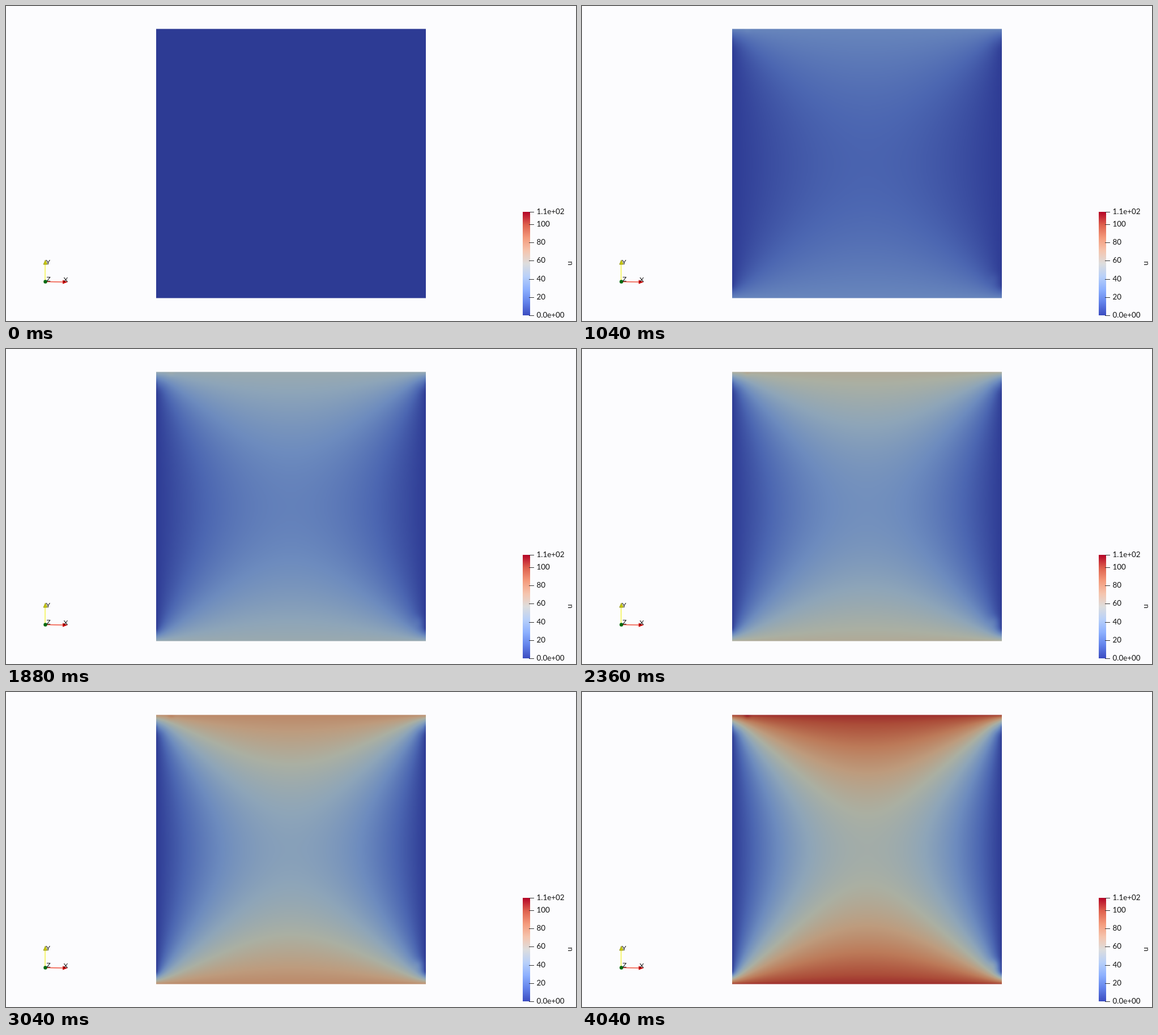
Recreate the animation shown at these times as an HTML page with a canvas. Size 1006 by 557 pixels, loop 4.08 s.

```html
<!DOCTYPE html>
<html lang="en">
<head>
<meta charset="utf-8">
<title>Heated plate</title>
<style>
  html, body { margin: 0; width: 100%; height: 100%; overflow: hidden; background: #fcfcfe; }
  canvas { position: absolute; left: 265px; top: 40px; }
  svg { position: absolute; left: 0; top: 0; }
  text { font-family: Lato, "Liberation Sans", sans-serif; font-size: 13.4px; fill: #111; }
  .axis text { font-size: 12px; }
</style>
</head>
<body>
<canvas id="plate" width="476" height="477"></canvas>
<svg width="1006" height="557">
  <defs><linearGradient id="scale" x1="0" y1="1" x2="0" y2="0"></linearGradient></defs>
  <g class="axis">
    <path d="M69 487V456" stroke="#f4f43c" stroke-width="1.4"/>
    <path d="M66 457L69.5 449L73 457Z" fill="#c9c900" stroke="#77770a" stroke-width=".6"/>
    <path d="M70 487.5L101 488" stroke="#f0503c" stroke-width="1.4"/>
    <path d="M100 484.5L109 488L100 491.5Z" fill="#c80808"/>
    <circle cx="69.5" cy="487.5" r="3.2" fill="#066b12"/>
    <text x="70.5" y="457">Y</text>
    <text x="71.5" y="487">Z</text>
    <text x="101.5" y="488">X</text>
  </g>
  <g id="legend"><rect x="912" y="364" width="13" height="183" fill="url(#scale)"/></g>
  <text transform="translate(998.5 458.8) rotate(-90)">u</text>
</svg>
<script>
const LOOP = 4080, STEP = 40, STEPS = 100;
const PEAK = 0.93;      // final boundary value as a share of the colour range
const RAMP = 0.046;     // corner ramp as a share of the side
const SHADE = 0.77;     // darkening by the fine mesh lines
const COOL_WARM = [
  [59, 76, 192], [98, 130, 234], [141, 176, 254], [184, 208, 249], [221, 221, 221],
  [245, 196, 173], [244, 154, 123], [222, 96, 77], [180, 4, 38]
];

function colorAt(v) {
  const p = v * 8, i = Math.min(Math.floor(p), 7);
  return COOL_WARM[i].map((c, j) => c + (COOL_WARM[i + 1][j] - c) * (p - i));
}

// Colour seen through the mesh: darker, and slightly olive in the mid range
function meshColor(v) {
  const [r, g, b] = colorAt(v).map(c => c * SHADE), tint = Math.sin(Math.PI * v);
  return [r, g + 5 * tint, b - 8 * tint];
}

// Colour bar
function add(parent, name, attrs, text = '') {
  const el = document.createElementNS('http://www.w3.org/2000/svg', name);
  for (const key in attrs) el.setAttribute(key, attrs[key]);
  el.textContent = text;
  parent.append(el);
}
const scale = document.getElementById('scale'), legend = document.getElementById('legend');
COOL_WARM.forEach((c, i) => add(scale, 'stop', { offset: i / 8, 'stop-color': `rgb(${c})` }));
function tick(y, label) {
  add(legend, 'path', { d: `M923 ${y}H932`, stroke: '#333' });
  add(legend, 'text', { x: 936.5, y: y + 3.7 }, label);
}
tick(364.5, '1.1e+02');
for (let n = 20; n <= 100; n += 20) tick(Math.round(547 - n * 1.61) + 0.5, n);
tick(547.5, '0.0e+00');

// Steady heat field: warm top and bottom, cold sides
const canvas = document.getElementById('plate'), ctx = canvas.getContext('2d');
const W = canvas.width, H = canvas.height;
const field = new Float32Array(W * H).fill(1);
const pixels = ctx.createImageData(W, H);

for (let n = 1; n < 120; n += 2) {
  const a = n * Math.PI;
  const b = 4 / a * Math.sin(a * RAMP) / (a * RAMP) / (1 + Math.exp(-a));
  const across = Array.from({ length: W }, (_, i) => {
    const x = (i + 0.5) / W;
    return b * (Math.exp(-a * x) + Math.exp(-a * (1 - x)));
  });
  for (let y = 0; y < H; y++) {
    const s = Math.sin(a * (y + 0.5) / H);
    for (let x = 0; x < W; x++) field[y * W + x] -= s * across[x];
  }
}

// Small corner irregularities
function bump(cx, cy, radius, height) {
  for (let y = 0; y < H; y++) for (let x = 0; x < W; x++)
    field[y * W + x] += height * Math.exp(-((x - cx) ** 2 + (y - cy) ** 2) / radius ** 2);
}
bump(26, 2, 6, 0.06);
bump(0, 22, 10, 0.12);
bump(475, 22, 10, 0.12);
bump(463, 442, 10, 0.09);

const palette = Array.from({ length: 1025 }, (_, i) => meshColor(i / 1024));

function drawPlate(step) {
  const gain = step / STEPS * PEAK * 1024, data = pixels.data;
  for (let i = 0, p = 0; i < field.length; i++, p += 4) {
    const c = palette[Math.max(0, Math.min(1024, Math.round(field[i] * gain)))];
    const edge = i < W || i >= W * (H - 1);
    data[p] = c[0];
    data[p + 1] = c[1];
    data[p + 2] = c[2];
    data[p + 3] = edge ? 128 : 255;
  }
  ctx.putImageData(pixels, 0, 0);
}

let shown = -1;
function frame() {
  const step = Math.max(0, Math.floor(performance.now() % LOOP / STEP) - 1);
  if (step !== shown) drawPlate(shown = step);
  requestAnimationFrame(frame);
}
frame();
</script>
</body>
</html>
```
